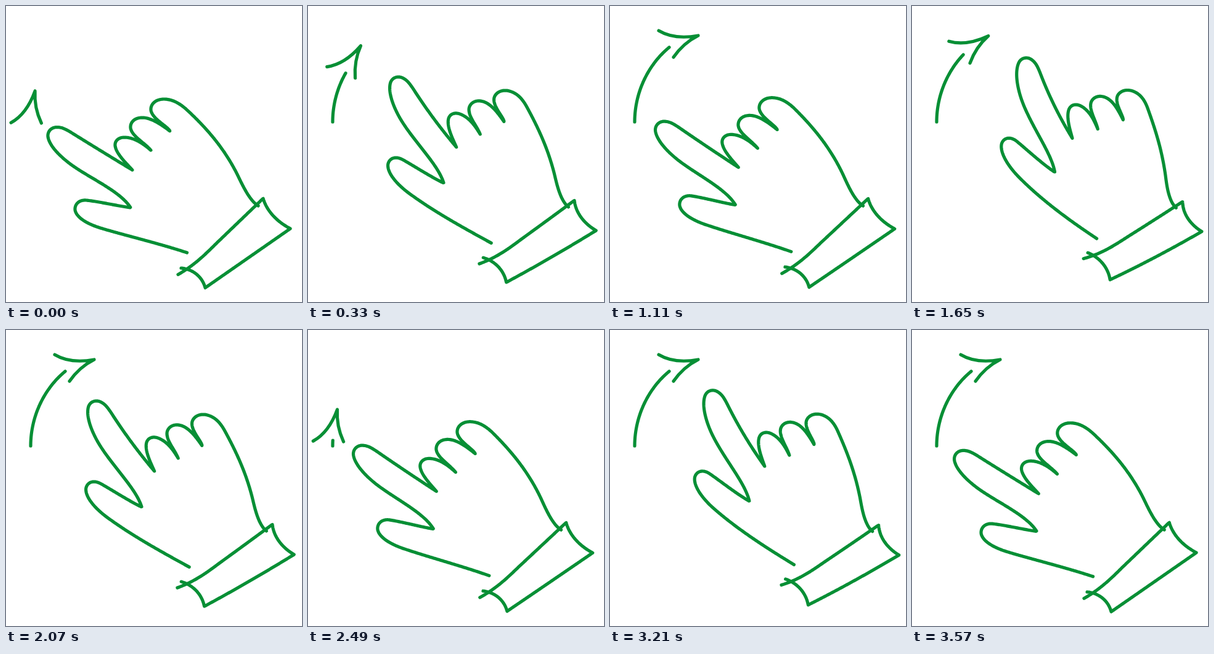
These frames come from a looping animation (480x480 px, 3.6 s). An HTML page with a canvas:

```html
<!DOCTYPE html>
<html lang="en">
<head>
<meta charset="utf-8">
<title>Swiping hand</title>
<style>
  html, body { margin: 0; width: 100%; height: 100%; overflow: hidden; background: #fff; }
  canvas { display: block; width: 480px; height: 480px; }
</style>
</head>
<body>
<canvas id="stage" width="480" height="480"></canvas>
<script>
const ctx = document.getElementById('stage').getContext('2d');
const SWING = 1200, STEP = 30, INK = '#078f35';

// The hand bends like a strip: fixed at ROOT, curling evenly along UP.
const ROOT = [443.5, 475], UP = [-0.6486, -0.7611], SIDE = [0.7611, -0.6486];
const RADIUS = 1225, BEND_RANGE = 2.165;

// Outlines in the pose that is curled furthest to the left.
const HAND = `M409,324 C394,315 382,287 374,271 C354.5,233 329,201.5 294,169
  C280,156 268,151 256,151 C243,151 234,159 235,169 C237,183 262,195 266,203
  C249,190 234,181 221,181 C208,181 201,189 202,198 C204,211 225,222 235,234
  C219,220 205,213 192,213 C182,213 176,219 177,227 C179,240 195,255 205,266
  C172,246 140,226.5 105.5,205 C95.5,199 90,196.5 82.5,196.5 C73,196.5 67,204 68,212
  C70,225 84,241 104,256 C135,279 185,300 202,327 C180,324 150,317 130,315
  C118,314 111,322 112,331 C114,342 129,352 150,359 C185,370 245,384 293.5,400`;
const CUFF = `M279,435.5 C304,421 320,406 340,386 L417,312 C423,333 440,350 461,361
  L323,457 C319,441 305,427 284,425`;

const smooth = x => x * x * (3 - 2 * x);

// Position along and across the strip, once it is straightened.
function unbend({ x, y }) {
  const dx = x - ROOT[0], dy = y - ROOT[1];
  const along = dx * UP[0] + dy * UP[1];
  const across = RADIUS + dx * SIDE[0] + dy * SIDE[1];
  return [RADIUS * Math.atan2(along, across), Math.hypot(along, across) - RADIUS];
}

function bend([s, v], curl) {
  let along = s, across = v;
  if (Math.abs(curl) > 1e-7) {
    const r = 1 / curl, angle = s * curl;
    along = (r + v) * Math.sin(angle);
    across = (r + v) * Math.cos(angle) - r;
  }
  return [ROOT[0] + along * UP[0] + across * SIDE[0],
          ROOT[1] + along * UP[1] + across * SIDE[1]];
}

function sample(d) {
  const path = document.createElementNS('http://www.w3.org/2000/svg', 'path');
  path.setAttribute('d', d);
  const length = path.getTotalLength(), count = Math.ceil(length / 1.5);
  return Array.from({ length: count + 1 }, (_, i) =>
    unbend(path.getPointAtLength(length * i / count)));
}

const outlines = [HAND, CUFF].map(sample);

function strokePoints(points) {
  ctx.beginPath();
  points.forEach(p => ctx.lineTo(...p));
  ctx.stroke();
}

function drawHand(t) {
  const lift = smooth(1 - Math.abs(1 - t / 600));
  const curl = (1 - BEND_RANGE * lift) / RADIUS;
  outlines.forEach(outline => strokePoints(outline.map(p => bend(p, curl))));
}

const cubic = (a, b, c, d, t) => {
  const u = 1 - t;
  return u * u * u * a + 3 * u * u * t * b + 3 * u * t * t * c + t * t * t * d;
};
const arcPoint = t => [cubic(40, 40, 62, 96, t), cubic(188, 140, 95, 67, t)];

// The arc grows, stops just short of its eased end, and carries the arrowhead.
function drawArrow(t) {
  const grown = smooth(Math.min(t, 540) / 600) / smooth(0.9);
  if (grown > 0) {
    strokePoints(Array.from({ length: 31 }, (_, i) => arcPoint(grown * i / 30)));
  }
  ctx.save();
  ctx.translate(...arcPoint(grown));
  ctx.rotate((grown * grown - 1) * Math.PI / 3);
  ctx.beginPath();
  ctx.moveTo(-17, -27);
  ctx.quadraticCurveTo(8, -12, 47, -19);
  ctx.quadraticCurveTo(23, -7, 7, 16);
  ctx.stroke();
  ctx.restore();
}

function draw(now) {
  const t = Math.floor(now / STEP) * STEP % SWING;
  ctx.fillStyle = '#fff';
  ctx.fillRect(0, 0, 480, 480);
  ctx.strokeStyle = INK;
  ctx.lineWidth = 5.2;
  ctx.lineCap = ctx.lineJoin = 'round';
  drawArrow(t);
  drawHand(t);
}

let start;
function tick(now) {
  start ??= now;
  draw(now - start);
  requestAnimationFrame(tick);
}
draw(0);
requestAnimationFrame(tick);
</script>
</body>
</html>
```
